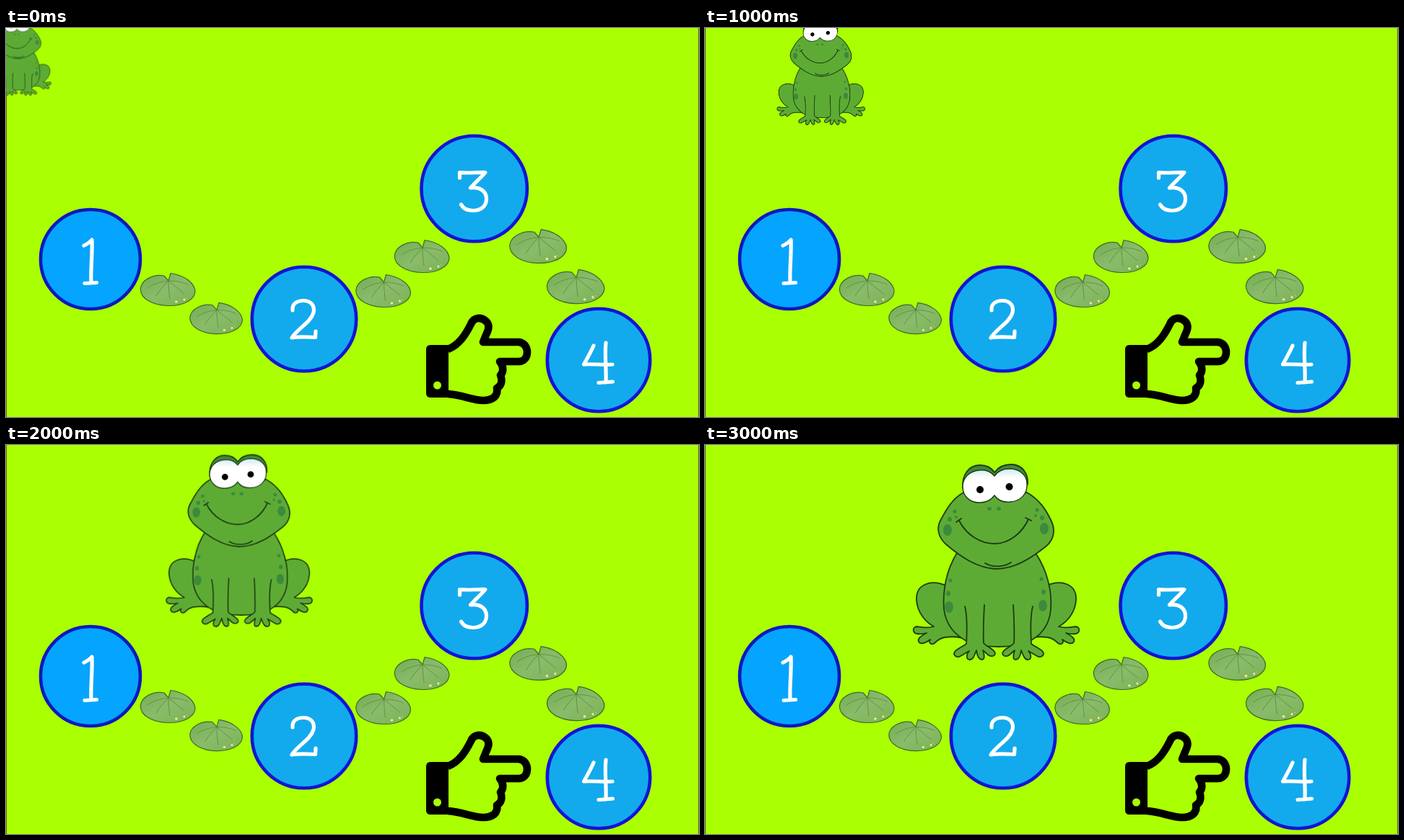
Recreate the animation shown at these times as an HTML page. Size 960 px wide and 540 px high, loop 3.6 s.

```html
<!DOCTYPE html>
<html lang="en">
<head>
<meta charset="utf-8">
<title>Frog counting path</title>
<style>
  html, body { margin: 0; width: 100%; height: 100%; overflow: hidden; background: #af0; }
  svg { display: block; width: 960px; height: 540px; }
  .stop { fill: #12aaed; stroke: #1313d6; stroke-width: 4.6; }
  .first { fill: #05a4ff; stroke: #0c18bd; }
  .digit { fill: none; stroke: #fff; stroke-width: 5.2; stroke-linecap: round; stroke-linejoin: round; }
  .skin { fill: #5dab35; stroke: #1c3d12; stroke-width: 1.8; stroke-linejoin: round; stroke-linecap: round; }
  .line { fill: none; stroke: #1c3d12; stroke-width: 1.9; stroke-linecap: round; }
  .spot { fill: #3c8a3c; }

  /* The frog hops from pose to pose with hard changes; its origin is between its feet. */
  #frog { animation: hop 3600ms step-end infinite; transform-origin: 0 0; }
  @keyframes hop {
    0%       { transform: translate(16.5px, 93.5px) scale(.404); }
    13.8889% { transform: translate(73.5px, 95px) scale(.404); }
    27.7778% { transform: translate(161px, 134px) scale(.53); }
    41.6667% { transform: translate(235px, 192px) scale(.687); }
    55.5556% { transform: translate(323.5px, 252px) scale(.88); }
    69.4444% { transform: translate(411.5px, 281.5px) scale(.935); }
    83.3333%, 100% { transform: translate(404px, 298px) scale(1); }
  }
</style>
</head>
<body>
<svg viewBox="0 0 960 540">
  <defs>
    <linearGradient id="leaf" x1="0" y1="0" x2="1" y2="1">
      <stop offset="0" stop-color="#74ad52"/>
      <stop offset=".5" stop-color="#8abb6a"/>
      <stop offset="1" stop-color="#7ab254"/>
    </linearGradient>
    <linearGradient id="eye" x1="0" y1="0" x2="0" y2="1">
      <stop offset="0" stop-color="#cfebf2"/>
      <stop offset=".28" stop-color="#fff"/>
    </linearGradient>

    <!-- Lily pad, 77 wide, centred on its origin -->
    <g id="pad" stroke-linejoin="round" stroke-linecap="round">
      <path d="M-5-19C-20-22-37-13-37.7-1C-38 13-20 22 0 22.5C22 23 38 14 38 2C37-9 23-20 4-22.5L1-12Z"
            fill="url(#leaf)" stroke="#3f6830" stroke-width="1.2"/>
      <path d="M1-12C-10-11-20-8-28-2M1-12C-6-5-12 2-16 9M1-12C1-3 2 5 3 13M1-12C8-6 16 0 23 6M1-12C10-12 19-11 28-7"
            fill="none" stroke="#5a8a40" stroke-width=".8"/>
      <g fill="#e2eeA0" stroke="#7a9d40" stroke-width=".5">
        <ellipse cx="12" cy="17" rx="2.4" ry="2"/>
        <circle cx="23" cy="14" r="2"/>
        <circle cx="27" cy="12" r="1"/>
      </g>
    </g>

    <path id="hind" class="skin" d="M336 196C312 185 292 194 293 215C294 233 306 246 317 252C308 255 300 253 294 252C287 252 287 261 294 262C299 263 303 262 307 261C299 265 294 269 296 273C299 278 307 274 312 270C309 275 314 278 318 275C322 271 326 268 332 267C341 266 352 265 361 270L365 225Z"/>
    <path id="fore" class="skin" d="M360 224C364 240 363 259 362 276C357 280 349 283 346 287C343 292 349 296 354 293L366 286C361 292 362 298 367 298C371 298 373 293 376 285C377 293 380 298 384 298C388 297 387 291 385 285L393 292C399 295 404 291 401 287C398 282 390 280 386 275C385 258 386 240 387 222"/>
    <g id="freckles" class="spot">
      <ellipse cx="336" cy="118" rx="6" ry="8"/>
      <ellipse cx="339" cy="103" rx="3" ry="3.2"/>
      <circle cx="346" cy="92" r="2.6"/>
      <circle cx="348" cy="100" r="1.9"/>
      <ellipse cx="338" cy="225" rx="5.8" ry="8"/>
      <ellipse cx="337" cy="206" rx="3" ry="3.5"/>
      <circle cx="340" cy="188" r="2.6"/>
    </g>
  </defs>

  <rect width="960" height="540" fill="#af0"/>
  <path d="M.5 0V540M959.5 0V540" stroke="#587025"/>

  <use href="#pad" transform="translate(224 363)"/>
  <use href="#pad" transform="translate(291 403) scale(.96)"/>
  <use href="#pad" transform="translate(522.5 365)"/>
  <use href="#pad" transform="translate(576 317)"/>
  <use href="#pad" transform="translate(737 303) scale(1.04)"/>
  <use href="#pad" transform="translate(789 359) scale(1.05)"/>

  <circle class="stop first" cx="117" cy="321" r="69"/>
  <circle class="stop" cx="413" cy="404" r="72.2"/>
  <circle class="stop" cx="648.7" cy="223" r="73.2"/>
  <circle class="stop" cx="821" cy="461" r="71.2"/>

  <!-- Hand-lettered digits -->
  <path class="digit" role="img" aria-label="1" d="M108 302C112 300 116 298 119 294C120 313 117 334 118 354M109 354.5L125.5 353.5"/>
  <path class="digit" role="img" aria-label="2" d="M397 392C396 382 404 378.5 412 378.5C423 378.5 428 386 426 395C422 409 404 417 396 430C407 428 418 429 428.5 429.5L429 421"/>
  <path class="digit" role="img" aria-label="3" d="M628.5 208L628.5 200.5C640 202 653 200 664 200.5C658 208 650 214 643.5 222C657 220 666 227 665.5 238C665 249 656 253.5 647 253.5C639 253.5 633 250 630.5 245"/>
  <path class="digit" role="img" aria-label="4" d="M814 441C810 450 805 459 800.5 467C813 466 827 468 840 467M831 437C829 454 832 473 831 492M821 492.5L840.5 491"/>

  <!-- Pointing hand -->
  <path d="M612 446C628 440 637 425 644 411C648 401 658 401 665 407C671 413 668 420 665 426L661 436H710C726 437 726 463 710 463H684C690 470 689 478 685 482C688 490 686 497 680 500C682 511 674 517 661 517C645 517 632 509 612 508"
        fill="none" stroke="#000" stroke-width="10.6" stroke-linejoin="round"/>
  <path d="M588 440H613V513H588Q582 513 582 507V446Q582 440 588 440Z"/>
  <circle cx="597.5" cy="496" r="5.5" fill="#af0"/>

  <g id="frog">
    <g transform="translate(-404 -298)">
      <use href="#hind"/>
      <use href="#hind" transform="translate(807) scale(-1 1)"/>
      <path class="skin" d="M349 150C334 174 329 203 331 228C334 252 349 266 366 274C390 282 424 282 446 274C464 266 477 252 479 228C481 203 474 174 458 150Z"/>
      <use href="#fore"/>
      <use href="#fore" transform="translate(814) scale(-1 1)"/>

      <path class="skin" d="M358 66C342 75 334 90 326 105C320 117 324 129 334 138C354 155 377 171 403 172C430 172 453 156 472 141C483 132 486 119 480 106C473 91 464 76 446 66Z"/>
      <path class="skin" style="fill:#43883a" d="M357 60C356 40 366 28 381 28C390 28 397 32 401 38C406 31 414 27 424 27C439 27 448 39 447 54L440 66H365Z"/>
      <path d="M401 43C395 36 387 34 380 35C366 36 357 46 357 58C357 71 367 80 380 80C389 80 396 77 401 70C406 77 414 80 423 79C437 78 447 68 446 54C446 42 436 33 422 33C413 33 405 37 401 43Z"
            fill="url(#eye)" stroke="#1c3d12" stroke-width="1.4"/>
      <circle cx="381" cy="62" r="5"/>
      <circle cx="421.5" cy="58" r="5"/>

      <g class="spot">
        <ellipse cx="394" cy="88.5" rx="3" ry="2.4"/>
        <ellipse cx="407" cy="88.5" rx="3" ry="2.4"/>
      </g>
      <path class="line" d="M352 105C362 125 382 137 401 137C422 137 440 121 448 103M348 107L355 102M444 101L452 105M388 164C398 170 414 170 424 163"/>
      <use href="#freckles"/>
      <use href="#freckles" transform="translate(806 -2) scale(-1 1)"/>
    </g>
  </g>
</svg>
</body>
</html>
```
